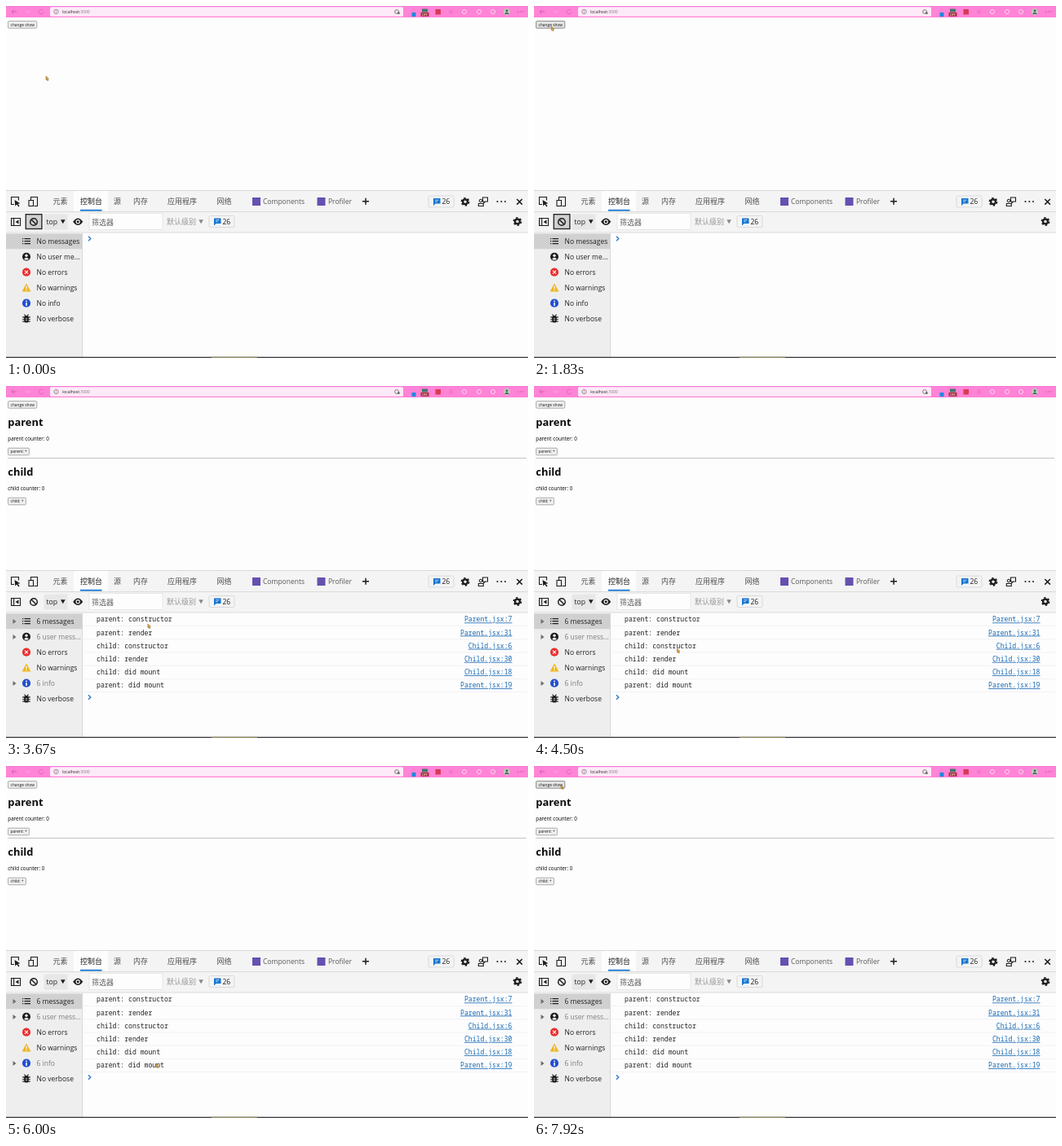
An HTML page that plays this animation: 640x432 px, repeating every 8000 ms.

```html
<!DOCTYPE html>
<html lang="en">
<head>
<meta charset="utf-8">
<title>Component lifecycle console</title>
<style>
  html, body { margin: 0; width: 100%; height: 100%; overflow: hidden; background: #fdfdfd; }
  svg { display: block; width: 640px; height: 432px; }
  text { font-family: "Open Sans", "Noto Sans CJK SC", "Noto Sans CJK", sans-serif; fill: #222; white-space: pre; }
  .mono { font-family: "Noto Sans Mono", "DejaVu Sans Mono", monospace; font-size: 8.15px; }
  .link { fill: #1769b5; text-decoration: underline; }
  .cjk { font-family: "Noto Sans CJK SC", "Noto Sans CJK", sans-serif; font-size: 9px; }
  .line { fill: none; stroke: #1c1c1c; stroke-width: 1.1; }
</style>
</head>
<body>
<svg id="stage" viewBox="0 0 640 432" xmlns="http://www.w3.org/2000/svg"></svg>
<script>
const LOOP = 8000, TICK = 1000 / 12;
const INK = '#1c1c1c', PAPER = '#fdfdfd', PANEL = '#f4f4f4', SIDE = '#eeeeee', RULE = '#d3d3d8';

const rect = (x, y, w, h, fill, extra = '') =>
  `<rect x="${x}" y="${y}" width="${w}" height="${h}" fill="${fill}" ${extra}/>`;
const disc = (x, y, r, fill, extra = '') => `<circle cx="${x}" cy="${y}" r="${r}" fill="${fill}" ${extra}/>`;
const line = (d, extra = '') => `<path class="line" d="${d}" ${extra}/>`;
const shape = (d, fill = INK) => `<path d="${d}" fill="${fill}"/>`;
const at = (x, y, content) => `<g transform="translate(${x} ${y})">${content}</g>`;
const text = (x, y, size, str, extra = '') => `<text x="${x}" y="${y}" font-size="${size}" ${extra}>${str}</text>`;
const cjk = (x, y, str, fill = '#505050') => `<text class="cjk" x="${x}" y="${y}" style="fill:${fill}">${str}</text>`;
const group = (id, content) => `<g id="${id}">${content}</g>`;

const button = (x, y, w, label, id = '') =>
  rect(x, y, w, 8.6, '#efefef', `id="${id}" rx="1" stroke="#999" stroke-width=".8"`) +
  text(x + 3, y + 6.1, 4.85, label, 'style="fill:#111"');

const gear = (x, y) => at(x, y,
  disc(0, 0, 2.9, 'none', `stroke="${INK}" stroke-width="2.3"`) +
  disc(0, 0, 4.6, 'none', `stroke="${INK}" stroke-width="1.6" stroke-dasharray="2.41"`));

const badge = (x, y) =>
  rect(x, y, 31, 14, PANEL, `rx="1.5" stroke="${RULE}" stroke-width=".8"`) +
  shape(`M${x + 6} ${y + 3}h8.5v6.5h-6l-2.5 2.5z`, '#1273d0') +
  line(`M${x + 8} ${y + 5.2}h4.5m-4.5 2h3`, 'style="stroke:#fff;stroke-width:.7"') +
  text(x + 16.4, y + 10.2, 8.6, '26');

function browserBar() {
  const icons = [562, 580, 597].map(x =>
    disc(x, 7, 2.6, 'none', 'stroke="#ffdcf5" stroke-width=".9"')).join('');
  return rect(0, 0, 640, 14, '#ff83d6') + rect(0, 0, 640, 1, '#f57cdc') +
    rect(54, 1.2, 433, 11.6, '#fdeaf8', 'rx="1.5"') +
    line('M13 7H7m2.5-2.5L7 7l2.5 2.5', 'style="stroke:#c25aa2;stroke-width:.8"') +
    line('M23 7h6m-2.5-2.5L29 7l-2.5 2.5', 'style="stroke:#ffa9e3;stroke-width:.8"') +
    line('M45.4 5.4a2.8 2.8 0 1 0 .4 2.6', 'style="stroke:#d067b0;stroke-width:.8"') +
    disc(61.5, 7, 2.7, 'none', 'stroke="#77606f" stroke-width=".7"') +
    line('M61.5 6.5v2M61.5 5.2v.7', 'style="stroke:#77606f;stroke-width:.6"') +
    text(69, 8.9, 5, 'localhost<tspan fill="#86757f">:3000</tspan>') +
    disc(479, 7, 2.4, 'none', 'stroke="#6e5e68" stroke-width=".8"') + disc(481.4, 8.7, 1.4, '#4f6f55') +
    rect(497.5, 8, 5, 5, '#2387df') +
    rect(510, 3.5, 7, 4, '#48756a') + rect(508.5, 8, 10, 4.7, '#a72c34') +
    text(509.7, 11.9, 4, 'OFF', 'style="fill:#fff"') +
    rect(526.5, 4, 6.5, 6.5, '#d93a56') +
    rect(543, 4.5, 5, 5, '#f578cb') + icons +
    disc(614, 7, 4.2, '#c3c9c3') + disc(614, 5.8, 1.5, '#4d6656') + shape('M611 10q3-4.5 6 0z', '#4d6656') +
    line('M627.5 7h7', 'style="stroke:#964a80;stroke-dasharray:1 2"');
}

function toolbars() {
  const tabs = [[57.5, '元素'], [132, '源'], [156, '内存'], [198, '应用程序'], [258.5, '网络']];
  return rect(0, 226, 640, 52, PANEL) + rect(0, 226, 640, .8, RULE) +
    rect(83, 227, 42, 25, PAPER) + rect(0, 252.3, 640, .8, RULE) + rect(0, 277.6, 640, .8, RULE) +
    line('M10 243.5H6.5v-9h9v4') + shape('M10.5 238l7 4.2-3 .6 2 2.8-1.2.8-2-2.9-2 2z') +
    line('M30.5 238v-3.5h8v11h-4M28 238.5h5.5v7H28z') +
    tabs.map(([x, label]) => cjk(x, 243.4, label)).join('') +
    cjk(91, 243.4, '控制台', '#1c1c1c') + rect(91, 249.8, 26.5, 1.8, '#1576cf') +
    rect(302, 235, 10, 10, '#6650b0') + text(315, 243.2, 8.5, 'Components', 'style="fill:#585858"') +
    rect(381.5, 235, 10, 10, '#6650b0') + text(395, 243.2, 8.5, 'Profiler', 'style="fill:#585858"') +
    line('M437 239.8h8m-4-4v8', 'style="stroke-width:1.5"') +
    badge(518, 233) + gear(563, 240.3) +
    line('M584.5 235h6v5h-3l-1.7 1.7V240h-1.3z') + disc(582, 239, 1.8, 'none', `stroke="${INK}"`) +
    line('M579.3 245.5v-3h6v3z') +
    [602.5, 607.3, 612].map(x => disc(x, 240, 1, INK)).join('') +
    line('M626.3 237l6.6 6.6m0-6.6l-6.6 6.6', 'style="stroke-width:1.5"') +
    line('M6.5 260.5h11v9h-11zM9.6 260.5v9') + shape('M15.5 262.5v5l-4-2.5z') +
    group('focus', rect(24.3, 255.7, 19.6, 17.8, '#cfcfcf', 'stroke="#2a2a2a" stroke-width="1.4"')) +
    disc(34, 265, 4.3, 'none', `stroke="${INK}" stroke-width="1.5"`) + line('M31 262l6 6', 'style="stroke-width:1.5"') +
    rect(46.5, 255.5, 29, 19, '#e7e7e7') + text(49.5, 268, 8.7, 'top') + shape('M67 262.3h5.6l-2.8 5z') +
    shape('M82.2 264.8q6-8.6 12 0q-6 8.6-12 0z') + disc(88.2, 264.8, 2.7, PANEL) + disc(88.2, 264.8, 1.5, INK) +
    rect(102, 254.6, 90, 20, PAPER, 'stroke="#dedee2" stroke-width=".7"') + cjk(105, 268.5, '筛选器', '#606060') +
    cjk(197, 268.3, '默认级别', '#969696') + shape('M236.3 262.3h5.6l-2.8 5z', '#888') +
    badge(249, 257.5) + gear(627, 264.5);
}

function sidebarIcons() {
  const warning = shape('M0-5.2L5.4 4.8H-5.4z', '#eeb51c') + rect(-.6, -2, 1.2, 3.6, '#fff') + rect(-.6, 2.4, 1.2, 1.2, '#fff');
  const bug = rect(-2.8, -3.6, 5.6, 8.4, INK, 'rx="2.6"') +
    line('M-4.8-1.8h9.6M-4.8 1h9.6M-4.8 3.6h9.6M-2.5-5l1.5 1.7M2.5-5L1-3.3') +
    line('M-1.1 0h2.2m-2.2 2h2.2', `style="stroke:${SIDE};stroke-width:.8"`);
  const icons = [
    line('M-2.5-3H5M-2.5 0H5M-2.5 3H5M-5-3h1.2M-5 0h1.2M-5 3h1.2', 'style="stroke-width:1.3"'),
    disc(0, 0, 5, INK) + disc(0, -1.5, 1.7, SIDE) + shape('M-3 3Q0-.7 3 3Q0 5-3 3z', SIDE),
    disc(0, 0, 5.1, '#e8302f') + line('M-2-2l4 4m0-4l-4 4', 'style="stroke:#fff"'),
    warning,
    disc(0, 0, 5.1, '#2150cf') + rect(-.8, -3.2, 1.6, 1.5, '#fff') + rect(-.8, -.8, 1.6, 4, '#fff'),
    bug
  ];
  return icons.map((icon, i) => at(25, 288.7 + 19 * i, icon)).join('');
}

function sidebarLabels(labels) {
  return labels.map((label, i) => {
    const y = 289 + 19 * i, counted = label[0] === '6';
    const style = counted && i ? 'style="fill:#7d7d7d"' : '';
    return (counted ? shape(`M8.5 ${y - 3}v6l4-3z`, '#6e6e6e') : '') + text(37.5, y + 3.1, 8.5, label, style);
  }).join('');
}

const prompt = y => line(`M101 ${y - 2.7}l2.8 2.7-2.8 2.7`, 'style="stroke:#2f73d0;stroke-width:1.3"');

function logs() {
  const rows = [
    ['parent: constructor', 'Parent.jsx:7'], ['parent: render', 'Parent.jsx:31'],
    ['child: constructor', 'Child.jsx:6'], ['child: render', 'Child.jsx:30'],
    ['child: did mount', 'Child.jsx:18'], ['parent: did mount', 'Parent.jsx:19']
  ];
  return rows.map(([message, link], i) => {
    const y = 289.4 + 16.15 * i;
    return `<text class="mono" x="111" y="${y}">${message}</text>` +
      `<text class="mono link" x="620.5" y="${y}" text-anchor="end">${link}</text>` +
      rect(94, y + 5, 546, .6, '#ececf4');
  }).join('') + prompt(382);
}

const counters = ['parent', 'child'].map((name, i) => {
  const y = 61 * i;
  return text(2.3, 49 + y, 12.9, name, 'font-weight="700" style="fill:#0c0c0c"') +
    text(2.3, 67.4 + y, 6.25, `${name} counter: 0`, 'style="fill:#000"') +
    button(2.6, 76.2 + y, i ? 21.8 : 25.8, `${name}: +`);
}).join('') + rect(2, 88, 636, .9, '#bdbdc2');

const stage = document.getElementById('stage');
stage.innerHTML = rect(0, 0, 640, 432, PAPER) + browserBar() +
  button(2.6, 18.6, 35.2, 'change show', 'toggle') + group('page', counters) + toolbars() +
  rect(0, 278.4, 93.5, 153, SIDE) + rect(0, 279.5, 93.5, 18.7, '#d0d0d0') + rect(93, 278.4, .8, 153, RULE) +
  sidebarIcons() +
  group('before', sidebarLabels(['No messages', 'No user me...', 'No errors', 'No warnings', 'No info', 'No verbose']) + prompt(285.5)) +
  group('after', sidebarLabels(['6 messages', '6 user mess...', 'No errors', 'No warnings', '6 info', 'No verbose']) + logs()) +
  rect(0, 430.6, 640, 1.4, '#45454a') + rect(252, 430.6, 56, 1.4, '#a09a70') +
  group('cursor', '<path d="M0 0V4.8L1.1 4L1.9 5.8L2.9 5.4L2.2 3.7L3.5 3.4Z" fill="#d9a440" stroke="#8a6428" stroke-width=".5"/>');

// Pointer stops: time, x, y
const stops = [
  [0, 49, 86], [170, 52, 98], [330, 55, 112], [580, 64.5, 147.5], [670, 65, 148], [830, 65, 148],
  [920, 50, 97], [1080, 39, 55], [1170, 31, 33], [1420, 21, 26], [1670, 21, 25],
  [2670, 22, 25], [2920, 48, 75], [3080, 98, 180], [3330, 160, 277], [3670, 174, 292],
  [4170, 178, 311], [4670, 174, 328], [5000, 181, 345], [5330, 185, 354], [5670, 187, 369],
  [6000, 184, 365], [6170, 165, 300], [6330, 132, 190], [6500, 101, 95], [6670, 85.5, 62.5],
  [7170, 68, 54], [7330, 44, 31], [7500, 32, 24], [7920, 33, 23], [8000, 33, 23]
];

function pointerAt(t) {
  const next = Math.max(1, stops.findIndex(stop => stop[0] > t));
  const [t0, x0, y0] = stops[next - 1], [t1, x1, y1] = stops[next];
  const p = (t - t0) / (t1 - t0);
  return [x0 + (x1 - x0) * p, y0 + (y1 - y0) * p];
}

const part = Object.fromEntries(['cursor', 'page', 'before', 'after', 'focus', 'toggle']
  .map(id => [id, document.getElementById(id)]));
const show = (el, visible) => el.setAttribute('visibility', visible ? 'visible' : 'hidden');

function draw(now) {
  const t = now % LOOP;
  // The picture moves 12 times a second, with every sixth step held.
  let step = Math.floor((t + 4) / TICK);
  if (step % 6 === 3) step--;
  const [x, y] = pointerAt(Math.min(step * TICK, LOOP - 1));
  const hover = x < 38 && y > 18 && y < 28;
  part.cursor.setAttribute('transform', `translate(${x.toFixed(1)} ${y.toFixed(1)})`);
  part.toggle.setAttribute('fill', hover ? '#e5e5e5' : '#efefef');
  part.toggle.setAttribute('stroke', hover ? '#707070' : '#999');
  show(part.focus, t < 2080);
  show(part.page, t >= 2165);
  show(part.before, t < 2329);
  show(part.after, t >= 2329);
  requestAnimationFrame(draw);
}
draw(0);
</script>
</body>
</html>
```
